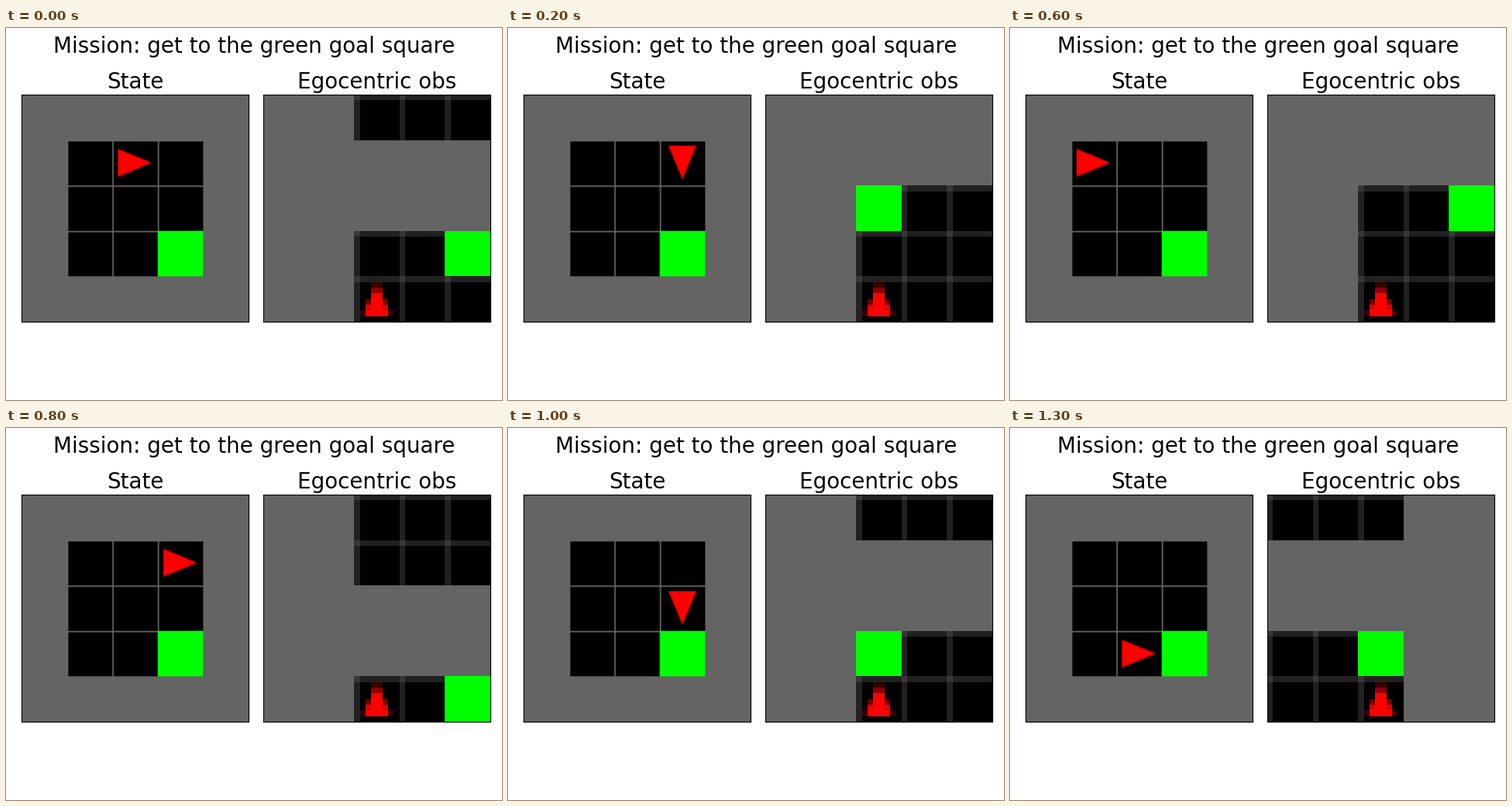
Recreate the animation shown at these times as a matplotlib script. Size 640 by 480 pixels, loop 1.4 s.

```python
import math

import matplotlib.pyplot as plt
import numpy as np
from matplotlib.animation import FuncAnimation

W, H, DPI = 640, 480, 100
N = 5                       # grid size including the walls
GOAL = (3, 3)
GREY, GREEN, RED = (100,) * 3, (0, 255, 0), (255, 0, 0)
RIGHT, DOWN, UP = 0, 1, 3
STEP = [(1, 0), (0, 1), (-1, 0), (0, -1)]

# Start pose (x, y, direction) and actions of each episode.
EPISODES = [
    ((2, 1, RIGHT), "FRF"),
    ((3, 1, DOWN), "F"),
    ((1, 1, RIGHT), "FFRF"),
    ((1, 3, DOWN), "LF"),
]


def walk():
    poses = []
    for (x, y, d), actions in EPISODES:
        poses.append((x, y, d))
        for action in actions:
            if action == "F":
                x, y = x + STEP[d][0], y + STEP[d][1]
            else:
                d = (d + (1 if action == "R" else -1)) % 4
            poses.append((x, y, d))
    return poses


def arrow_mask(x, y, direction):
    """Triangle pointing along the direction, in unit tile coordinates."""
    a = direction * math.pi / 2
    u = 0.5 + (x - 0.5) * math.cos(a) + (y - 0.5) * math.sin(a)
    v = 0.5 + (y - 0.5) * math.cos(a) - (x - 0.5) * math.sin(a)
    half = 0.31 * (0.87 - u) / 0.75
    return (u >= 0.12) & (np.abs(v - 0.5) <= half)


def tile(cell, size, direction=None):
    """One square tile, supersampled three times."""
    n = size * 3
    c = (np.arange(n) + 0.5) / n
    x, y = np.meshgrid(c, c)
    img = np.zeros((n, n, 3))
    img[(x <= 0.031) | (y <= 0.031)] = GREY
    if cell == "wall":
        img[:] = GREY
    elif cell == "goal":
        img[:] = GREEN
    if direction is not None:
        img[arrow_mask(x, y, direction)] = RED
    return img.reshape(size, 3, size, 3, 3).mean(axis=(1, 3))


def cell_at(x, y):
    x, y = x % N, y % N     # the view wraps around the grid
    if x in (0, N - 1) or y in (0, N - 1):
        return "wall"
    return "goal" if (x, y) == GOAL else "floor"


def compose(size, cell_of, agent, direction):
    rows = []
    for j in range(N):
        rows.append(np.hstack([
            tile(cell_of(i, j), size, direction if (i, j) == agent else None)
            for i in range(N)]))
    return np.vstack(rows).astype(np.uint8)


def state_image(pose):
    x, y, d = pose
    return compose(32, cell_at, (x, y), d)


def view_image(pose):
    x, y, d = pose
    fx, fy = STEP[d]

    def seen(i, j):
        ahead, side = N - 1 - j, i - N // 2
        return cell_at(x + ahead * fx - side * fy, y + ahead * fy + side * fx)

    return compose(8, seen, (N // 2, N - 1), UP)


def panel(left, title, image):
    ax = fig.add_axes([left / W, 101.1 / H, 292.8 / W, 292.8 / H])
    ax.set_title(title, fontsize=20)
    ax.set_xticks([])
    ax.set_yticks([])
    return ax.imshow(image, aspect="auto")


plt.rcParams["font.family"] = "DejaVu Sans"
poses = walk()
fig = plt.figure(figsize=(W / DPI, H / DPI), dpi=DPI)
fig.suptitle("Mission: get to the green goal square", fontsize=20)
state = panel(20.1, "State", state_image(poses[0]))
view = panel(332.1, "Egocentric obs", view_image(poses[0]))


def update(frame):
    state.set_data(state_image(poses[frame]))
    view.set_data(view_image(poses[frame]))
    return state, view


anim = FuncAnimation(fig, update, frames=len(poses), interval=100,
                     repeat=True, repeat_delay=0)
plt.show()
```
